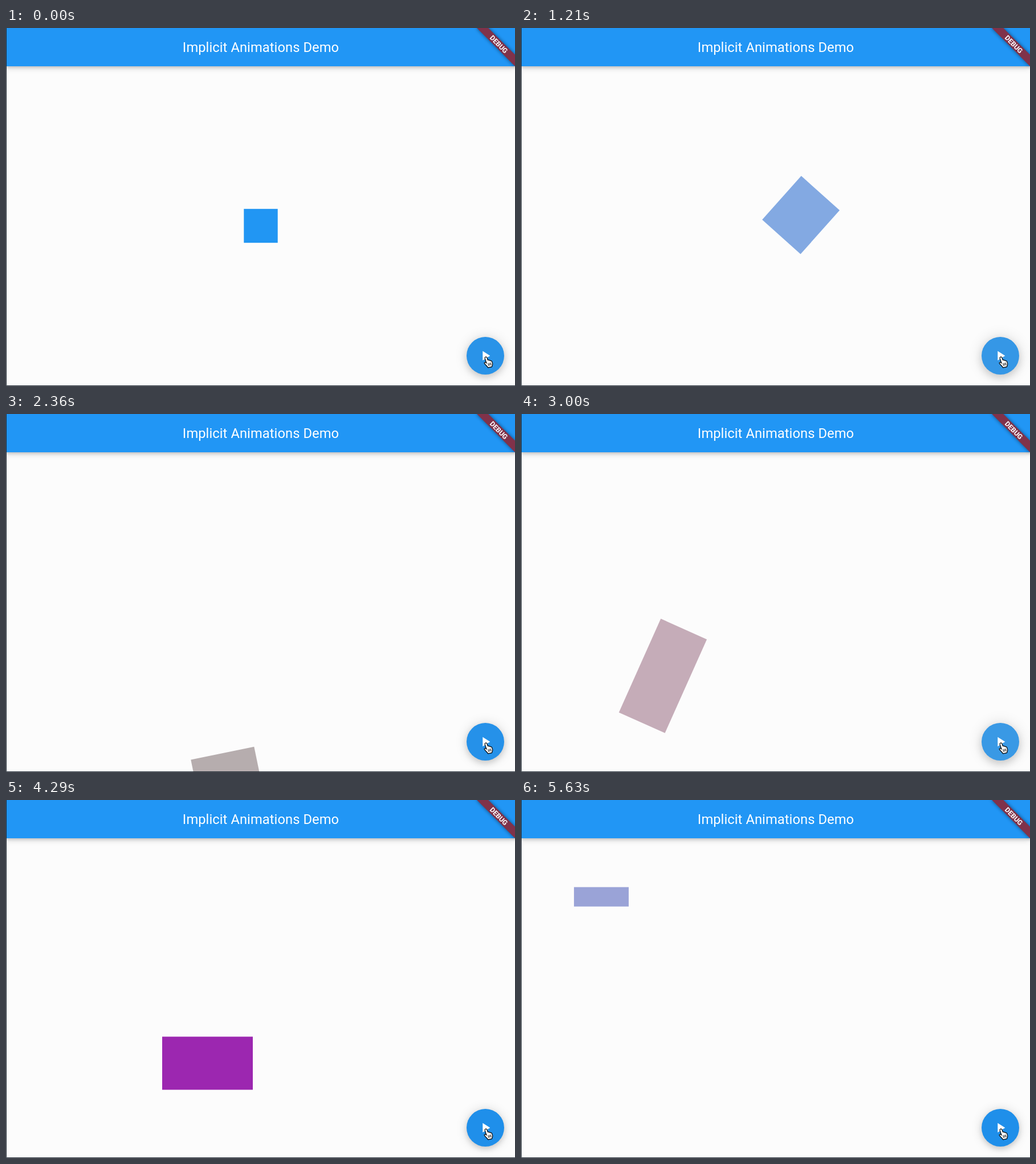
An HTML page that plays this animation: 893x627 px, repeating every 5760 ms.

```html
<!DOCTYPE html>
<html lang="en">
<head>
<meta charset="utf-8">
<title>Implicit Animations Demo</title>
<style>
  html, body { margin: 0; width: 100%; height: 100%; overflow: hidden; background: #fcfcfc; }
  #stage { position: absolute; left: 0; top: 0; width: 893px; height: 627px; overflow: hidden; }
  #stage > * { position: absolute; }
  svg { left: 0; top: 0; }
  #bar {
    left: 0; top: 0; width: 893px; height: 66.5px; background: #2196f5;
    box-shadow: 0 2px 5px rgba(0,0,0,.16), 0 4px 10px rgba(0,0,0,.13);
  }
  #fab { left: 808px; top: 541px; width: 66px; height: 66px; border-radius: 50%; }
  text { font-family: Roboto, "Open Sans", sans-serif; fill: #fff; text-anchor: middle; }
  #title { font-size: 23.7px; letter-spacing: .08px; }
  #debug { font-size: 12.07px; font-weight: 700; }
</style>
</head>
<body>
<div id="stage">
  <svg width="893" height="627"><rect id="box"/></svg>
  <div id="bar"></div>
  <div id="fab"></div>
  <svg width="893" height="627">
    <defs>
      <filter id="soft" x="-20%" y="-80%" width="140%" height="260%">
        <feGaussianBlur stdDeviation="3"/>
      </filter>
    </defs>
    <text id="title" x="447" y="42">Implicit Animations Demo</text>
    <g transform="translate(893 0) rotate(45)">
      <rect x="-47.3" y="33.1" width="94.6" height="14.2" fill="#000" opacity=".5" filter="url(#soft)"/>
      <rect x="-47.3" y="33.1" width="94.6" height="14.2" fill="#80324a"/>
      <text id="debug" x="0" y="44.5">DEBUG</text>
    </g>
    <path d="M836.3 565.7V582.3L849.3 574Z" fill="#fff"/>
    <g transform="translate(837 575)" stroke="#000" stroke-width="1.2" stroke-linejoin="round" stroke-linecap="round">
      <path fill="#fff" d="M4.2 1.2C5.4.6 6.4 1.3 6.9 2.5L8.3 6.6C9 6 10.3 6.2 10.8 7.2C11.6 6.7 12.8 7 13.2 8C14.2 7.6 15.2 8.2 15.6 9.4L16.6 12.6C17 14.8 15.8 16 15.4 18.4L8.6 19.8C7.6 17.6 4.6 15.6 2.4 12.4C1.6 10.8 3.4 9.8 4.8 11L6 12L3.2 3.6C2.8 2.4 3.2 1.6 4.2 1.2Z"/>
      <path fill="none" stroke-width="1" d="M8.8 12.6L9.9 16.4M11 12L12.1 15.8M13.2 11.5L14.2 15.1"/>
    </g>
    <path d="M.5 0V626.5H893" fill="none" stroke="#1d2731"/>
  </svg>
</div>
<script>
const LOOP = 5760, TICK = 1000 / 14, TURN = 500;
const BODY = { x: 447, y: 346.5, w: 892, h: 559 };
const BLUE = [33, 150, 243], INDIGO = [63, 81, 181], BROWN = [121, 85, 72], PURPLE = [156, 39, 176];

// Each click adds a quarter turn of the whole body and picks a new
// alignment (ax, ay), size, colour and opacity.
const states = [
  { at: 0,    v: [0, 0, 59.4, 59.4, ...BLUE, 1] },
  { at: 135,  v: [.621, .088, 150, 95, ...INDIGO, .82] },
  { at: 982,  v: [-.953, -.287, 48.5, 85, ...BLUE, .324] },
  { at: 1922, v: [-.931, -.555, 215.7, 117.5, ...BROWN, .526] },
  { at: 2866, v: [.622, -.625, 82, 9.3, ...PURPLE, .24] },
  { at: 3756, v: [.2866, .4675, 93, 159, ...PURPLE, 1] },
  { at: 4675, v: [.769, .674, 96, 34, ...INDIGO, .515] }
];
const presses = [70, 930, 1860, 2790, 3570, 4570];
const glow = [[0, .8], [140, .75], [210, 1], [300, .8], [570, 0]];

const box = document.getElementById('box'), fab = document.getElementById('fab');
const mix = (a, b, p) => a + (b - a) * p;
const mixAll = (a, b, p) => a.map((n, i) => mix(n, b[i], p));

function snap(t) {
  let k = Math.floor((t + 5) / TICK);
  if (Math.round(k * TICK / 10) * 10 > t) k--;
  return Math.max(0, k) * TICK;
}

function drawBox(t) {
  let i = states.length - 1;
  while (i > 1 && t < states[i].at) i--;
  const p = Math.min(1, Math.max(0, (t - states[i].at) / TURN));
  const [ax, ay, w, h, r, g, b, alpha] = mixAll(states[i - 1].v, states[i].v, p);
  const x = ax * (BODY.w - w) / 2, y = ay * (BODY.h - h) / 2;
  const set = { x: x - w / 2, y: y - h / 2, width: w, height: h,
    fill: `rgb(${[r, g, b].map(Math.round)})`, 'fill-opacity': alpha,
    transform: `translate(${BODY.x} ${BODY.y}) rotate(${90 * (i - 1 + p)})` };
  for (const key in set) box.setAttribute(key, set[key]);
}

function pressLevel(t) {
  if (t < presses[0] - 6) return .4;
  const from = presses.filter(n => n <= t + 6).pop();
  const d = Math.max(0, t - from);
  for (let i = 1; i < glow.length; i++) {
    const [t0, a] = glow[i - 1], [t1, b] = glow[i];
    if (d < t1) return mix(a, b, (d - t0) / (t1 - t0));
  }
  return 0;
}

function drawFab(t) {
  const q = pressLevel(t);
  const color = mixAll([31, 143, 234], [57, 153, 229], q).map(Math.round);
  fab.style.background = `rgb(${color})`;
  fab.style.boxShadow = `0 ${mix(4, 6, q)}px ${mix(10, 14, q)}px rgba(0,0,0,.14),` +
    `0 1px ${mix(20, 26, q)}px rgba(0,0,0,.14)`;
}

const start = performance.now();
function frame() {
  const t = snap((performance.now() - start) % LOOP);
  drawBox(t);
  drawFab(t);
  requestAnimationFrame(frame);
}
frame();
</script>
</body>
</html>
```
